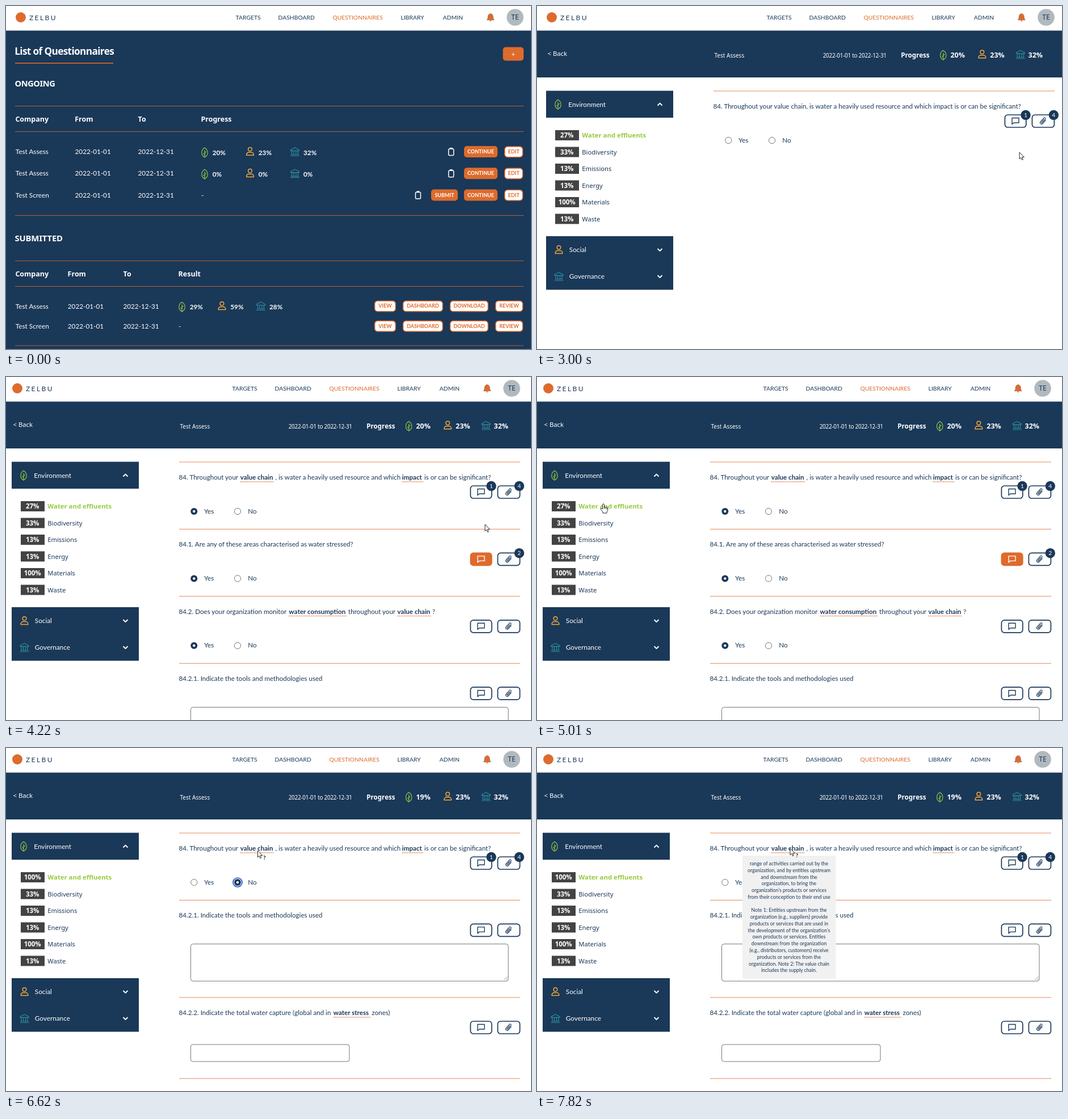
An HTML page that plays this animation: 925 px wide and 605 px high, repeating every 8 s.

```html
<!DOCTYPE html>
<html lang="en">
<head>
<meta charset="utf-8">
<title>Questionnaires</title>
<style>
html, body { margin: 0; width: 100%; height: 100%; overflow: hidden; background: #fff; }
svg { display: block; width: 925px; height: 605px; }
text { font: 11.76px Lato, sans-serif; fill: #1a3858; white-space: pre; }
.h { font-family: "Noto Sans", "Open Sans", sans-serif; }
.s { font-weight: 600; }
.b { font-weight: 700; }
.w { fill: #fff; }
.o { fill: #dd6b2d; }
.g { fill: #97c93d; }
.m { text-anchor: middle; }
</style>
</head>
<body>
<svg viewBox="0 0 925 605"><g id="scene"></g><g id="cursor"></g></svg>
<script>
const LOOP = 8000, NAVY = '#1a3858', ORANGE = '#dd6b2d';

// Drawing helpers
const text = (x, y, s, cls = '', size = 11.76, spacing = 0) =>
  `<text x="${x}" y="${y}" class="${cls}" style="font-size:${size}px;letter-spacing:${spacing}px">${s.replace(/</g, '&lt;')}</text>`;
const rect = (x, y, w, h, fill, r = 0, stroke = 'none', sw = 1) =>
  `<rect x="${x}" y="${y}" width="${w}" height="${h}" rx="${r}" fill="${fill}" stroke="${stroke}" stroke-width="${sw}"/>`;
const circle = (x, y, r, fill, stroke = 'none', sw = 1) =>
  `<circle cx="${x}" cy="${y}" r="${r}" fill="${fill}" stroke="${stroke}" stroke-width="${sw}"/>`;
const path = (d, stroke, sw = 1.2, fill = 'none') =>
  `<path d="${d}" fill="${fill}" stroke="${stroke}" stroke-width="${sw}" stroke-linejoin="round"/>`;
const at = (x, y, s) => `<g transform="translate(${x} ${y})">${s}</g>`;
const rule = (x1, x2, y) => rect(x1, y, x2 - x1, 1, 'rgba(221,107,45,.8)');

const leaf = path('M0-8.3C7-4 7 5 0 8.3C-7 5-7-4 0-8.3ZM0-4V9.5M0 1L2.7-1.6M0 4L-2.7 1.4', '#8fc043', 1.2);
const person = circle(0, -4, 3.3, 'none', '#f2a93b', 1.5) +
  path('M-6.3 6.5V5.5a4 4 0 0 1 4-4H2.3a4 4 0 0 1 4 4V6.5Z', '#f2a93b', 1.5);
const bank = path('M-7.5-3.2L0-7.2L7.5-3.2V-1.6H-7.5ZM-5.5-1V4.6M-2-1V4.6M2-1V4.6M5.5-1V4.6M-6.8 5H6.8M-8 7.2H8', '#2f8fa0', 1.1);
const bin = rect(-4.5, -5, 9, 11.5, 'none', 1.5, '#fff', 1.5) + path('M-2.5-6.2H2.5', '#fff', 1.8);
const clip = '<g transform="rotate(42)">' +
  path('M2.6-4.5V3.6a2.6 2.6 0 0 1-5.2 0V-5a1.8 1.8 0 0 1 3.6 0V3a.9.9 0 0 1-1.8 0V-4', NAVY, 1.1) + '</g>';
const bell = path('M0-7C4-6.5 4.6-3 4.7 0C4.8 2 5.5 3 6.5 4.2H-6.5C-5.5 3-4.8 2-4.7 0C-4.6-3-4-6.5 0-7Z', '#7a4a3c', .5, ORANGE) +
  path('M-1.8 5a1.8 1.8 0 0 0 3.6 0Z', 'none', 0, ORANGE);

function header() {
  const items = [[398.6, 'TARGETS'], [473.6, 'DASHBOARD'], [569.4, 'QUESTIONNAIRES'], [689.6, 'LIBRARY'], [763.8, 'ADMIN']];
  return circle(20, 20, 9, ORANGE) + text(35, 24.5, 'ZELBU', '', 12, 2.4) +
    items.map(([x, s], i) => text(x, 24.3, s, i === 2 ? 'o' : '', 10.35)).join('') +
    at(847.7, 20.5, bell) + circle(891, 20, 14.8, '#b0b9be') + text(891, 24.3, 'TE', 'm h', 12);
}

// List of questionnaires
function scores(xs, y, values) {
  return [leaf, person, bank].map((icon, i) =>
    at(xs[i], y + [1.3, -.3, 0][i], icon) +
    text(xs[i] + [13.7, 14.8, 15][i], y + 5.5, values[i] + '%', 'b w')).join('');
}
function button(x1, x2, y, label, solid) {
  const box = solid ? rect(x1, y - 10, x2 - x1, 20, ORANGE, 5)
                    : rect(x1 + .7, y - 9, x2 - x1 - 1.4, 18.5, '#fff', 5, ORANGE, 1.5);
  return box + text((x1 + x2) / 2, y + 3.1, label, 'm b ' + (solid ? 'w' : 'o'), 9);
}
function tableRow(y, name, xs) {
  return text(16.8, y + 4, name, 'w') + text(xs[0], y + 4, '2022-01-01', 'w') + text(xs[1], y + 4, '2022-12-31', 'w');
}
function list() {
  const heads = (y, xs, last) => ['Company', 'From', 'To', last]
    .map((s, i) => text(xs[i], y, s, 'h s w', 12.5)).join('');
  const ongoing = [257, 295.2, 333.5].map((y, i) =>
    tableRow(y, i < 2 ? 'Test Assess' : 'Test Screen', [121.5, 232.5]) +
    (i < 2 ? scores([350, 430, 509], y, [[20, 23, 32], [0, 0, 0]][i]) + at(784.3, y, bin)
           : text(344, y + 4, '-', 'w') + at(726, y, bin) + button(749, 796, y, 'SUBMIT', true)) +
    button(807, 866, y, 'CONTINUE', true) + button(878, 911, y, 'EDIT')).join('');
  const submitted = [529.3, 564.5].map((y, i) =>
    tableRow(y + .5, i ? 'Test Screen' : 'Test Assess', [108.8, 206.4]) +
    (i ? text(304, y + 4, '-', 'w') : scores([310, 380.5, 449], y, [29, 59, 28])) +
    button(649, 687, y, 'VIEW') + button(699, 770, y, 'DASHBOARD') +
    button(782, 850, y, 'DOWNLOAD') + button(862, 911, y, 'REVIEW')).join('');
  return rect(0, 43.4, 925, 562, NAVY) + at(6, 0, header()) +
    text(15.2, 85.7, 'List of Questionnaires', 'h s w', 17.2, -.62) + rect(16, 100, 173, 1.6, ORANGE) +
    rect(875.5, 72.5, 36.5, 24, ORANGE, 5) + text(893.7, 89, '+', 'm w', 12) +
    text(15.5, 142, 'ONGOING', 'h s w', 14.6, -.4) + text(15.5, 415, 'SUBMITTED', 'h s w', 14.9, -.2) +
    [176, 221, 369, 449, 494, 598.5].map(y => rule(16, 912, y)).join('') +
    heads(203.8, [16.4, 121.2, 232.6, 343.4], 'Progress') + heads(476.8, [16.4, 108.6, 206.6, 303.6], 'Result') +
    ongoing + submitted;
}

// Questionnaire page
function sidebar(water) {
  const panel = (y, h) => rect(10, y, 224, h, NAVY);
  const entry = (y, x, icon, label, dir) => at(x, y, icon) + text(x + 18.3, y + 4.2, label, 'w') +
    path(`M206.5 ${y - 2 * dir}l4 ${4 * dir}l4 ${-4 * dir}`, '#fff', 1.8);
  const topics = [[water, 'Water and effluents'], [33, 'Biodiversity'], [13, 'Emissions'], [13, 'Energy'], [100, 'Materials'], [13, 'Waste']];
  return panel(149.5, 47.5) + entry(173.5, 31, leaf, 'Environment', -1) +
    panel(406, 94.5) + entry(430, 32.5, person, 'Social', 1) + entry(477, 32.5, bank, 'Governance', 1) +
    topics.map(([n, s], i) => {
      const y = 228 + i * 29.5;
      return rect(26, y - 9, 42, 18, '#434343') + text(46.7, y + 4.2, n + '%', 'm h b w', 11.5) +
        text(73.3, y + 4.2, s, i ? 'h' : 'h b g', i ? 11.15 : 11.35);
    }).join('');
}
function radio(x, y, state) {
  if (!state) return circle(x, y, 5.6, '#fff', '#767676');
  return (state === 'focus' ? circle(x, y, 8, '#fff', '#1f56d0', 1.7) : '') +
    circle(x, y, 6, NAVY) + circle(x, y, 2.2, '#fff');
}
function tools(y, notes, files, solid) {
  const badge = (x, n) => n ? circle(x, y + .8, 8.7, NAVY) + text(x, y + 4.3, String(n), 'm w', 10.2) : '';
  return rect(818.4, y + .5, 37.4, 22, solid ? ORANGE : '#fff', 5, solid ? ORANGE : NAVY, 1.7) +
    at(837, y + 11, path('M-6-5H6V3.5H-3L-6 6Z', solid ? '#fff' : NAVY, 1.4)) +
    rect(866.4, y + .5, 39, 22, '#fff', 5, NAVY, 1.7) + at(885.5, y + 11.5, clip) +
    badge(855, notes) + badge(904.3, files);
}
// Parts alternate: x, plain words, x, glossary term
function wording(y, parts, rich) {
  const size = 11.6, words = parts.filter((_, i) => i % 2);
  if (!rich) return text(parts[0], y, words.join(' ').replace(/ ([,?])/g, '$1'), '', size);
  return words.map((s, i) => {
    const x = parts[2 * i], term = i % 2;
    return text(x, y, s, term ? 'b' : '', size) + (term
      ? `<path d="M${x} ${y + 3.8}H${parts[2 * i + 2] - 2}" stroke="${ORANGE}" stroke-width="1.5" stroke-dasharray="1.5 1.5"/>` : '');
  }).join('');
}
const Q = {
  chain: [304.6, '84. Throughout your', 412.8, 'value chain', 474.6, ', is water a heavily used resource and which', 697.8, 'impact', 737, 'is or can be significant?'],
  areas: [304.6, '84.1. Are any of these areas characterised as water stressed?'],
  monitor: [304.6, '84.2. Does your organization monitor', 498.6, 'water consumption', 603, 'throughout your', 689.6, 'value chain', 751, '?'],
  methods: [304.6, '84.2.1. Indicate the tools and methodologies used'],
  capture: [304.6, '84.2.2. Indicate the total water capture (global and in', 576.8, 'water stress', 644.5, 'zones)']
};
function question(y, parts, rich, { yes, no, choice = false, notes, files, solid } = {}) {
  return rule(305, 906, y - .5) + wording(y + 31, parts, rich) + tools(y + 41.5, notes, files, solid) +
    (choice ? radio(331.3, y + 87, yes) + text(349, y + 90.5, 'Yes') +
              radio(408, y + 87, no) + text(426.3, y + 90.5, 'No') : '');
}
const field = (y, w, h) => rect(325.5, y, w, h, '#fff', 4, '#767676');
const area = y => field(y, 559.5, 65.5) + path(`M877.5 ${y + 63.5}l6-6M881 ${y + 63.5}l2.5-2.5`, '#767676', .8);

function questions({ rich, full, yes, no, short }) {
  const step = 118.4, row = i => 150 + i * step;
  const first = question(150, Q.chain, rich, { choice: true, yes, no, notes: 1, files: 4 });
  if (!full) return first;
  if (short) return first + question(row(1), Q.methods, rich) + area(row(1) + 77.3) +
    question(440, Q.capture, rich) + field(523, 279.5, 30) + rule(305, 906, 582.5);
  return first +
    question(row(1), Q.areas, rich, { choice: true, yes: 'on', files: 2, solid: true }) +
    question(row(2), Q.monitor, rich, { choice: true, yes: 'on' }) +
    question(row(3), Q.methods, rich) + area(row(3) + 77.3);
}
const NOTE = `range of activities carried out by the
organization, and by entities upstream
and downstream from the
organization, to bring the
organization’s products or services
from their conception to their end use

Note 1: Entities upstream from the
organization (e.g., suppliers) provide
products or services that are used in
the development of the organization’s
own products or services. Entities
downstream from the organization
(e.g., distributors, customers) receive
products or services from the
organization. Note 2: The value chain
includes the supply chain.`.split('\n');
const tooltip = opacity => `<g opacity="${opacity}">` + rect(362, 190, 164.5, 217, '#f1f1f1', 3) +
  NOTE.map((s, i) => text(444, 207 + i * 11.77, s, 'm', 8.75)).join('') + '</g>';

function page(o) {
  const score = (x, n) => text(x, 90.7, n + '%', 'h b w', 12.4);
  return rect(0, 43.4, 925, 82.6, NAVY) + at(o.shift || 0, 0, header() +
    text(12.5, 87.5, '< Back', 'h w', 11.3) + text(306.5, 91, 'Test Assess', 'h w', 10) +
    text(497.7, 91, '2022-01-01 to 2022-12-31', 'h w', 10, -.3) + text(635.3, 90.7, 'Progress', 'h b w', 11.6) +
    at(709.7, 86.5, leaf) + score(722.5, o.done ? 19 : 20) + at(778.3, 85.3, person) + score(792.3, 23) +
    at(845.8, 85.5, bank) + score(859.6, 32) +
    sidebar(o.done ? 100 : 27) + questions(o) + (o.tip ? tooltip(o.tip) : ''));
}

const answered = { rich: true, full: true, yes: 'on' };
const declined = { rich: true, full: true, no: 'focus' };
const result = { ...declined, short: true, done: true };
const scenes = [
  [0, list()],
  [3000, page({ shift: 6 })],
  [3210, page({ ...answered, rich: false })],
  [3410, page(answered)],
  [6020, page(declined)],
  [6220, page({ ...declined, short: true })],
  [6620, page(result)],
  [6820, page({ ...result, tip: .6 })],
  [7020, page({ ...result, tip: 1 })]
];

// Pointer: time, x, y, shape
const arrow = path('M0 0V11.8L2.7 9.3L4.5 13.5L6.3 12.7L4.6 8.6H8.3Z', '#111', .9, '#fff');
const pointers = {
  none: '',
  arrow,
  hand: path('M-1.4 9V1.2a1.4 1.4 0 0 1 2.8 0V6l.5-.6a1.2 1.2 0 0 1 2 .5l.4-.3a1.1 1.1 0 0 1 1.7.7l.3-.1a1 1 0 0 1 1.3 1V11.5L6 14.2V16H-1V14.2L-4.6 9.6a1.2 1.2 0 0 1 1.7-1.7ZM1.4 6V8.6M3.9 6V8.8M6 6.8V9', '#111', .9, '#fff'),
  help: arrow + '<text x="9.8" y="15.8" style="font:700 9.5px Lato,sans-serif;fill:#111;stroke:#fff;stroke-width:1.4;paint-order:stroke">?</text>'
};
const moves = [
  [0, 0, 0, 'none'], [200, 483, 450, 'arrow'], [400, 602, 393, 'arrow'], [600, 737, 322, 'arrow'],
  [800, 822, 271, 'arrow'], [1000, 840, 258, 'hand'], [1400, 839.5, 257.5, 'hand'],
  [3000, 850, 258, 'arrow'], [4220, 844, 260, 'arrow'], [4420, 690, 259, 'arrow'], [4620, 420, 250, 'arrow'],
  [4820, 185, 235, 'arrow'], [5010, 117, 224, 'hand'], [5210, 154, 226, 'hand'], [5410, 245, 216, 'arrow'],
  [5610, 366, 228, 'arrow'], [5820, 406.5, 235, 'arrow'], [6420, 428, 211, 'arrow'],
  [6620, 443.5, 181, 'help'], [6820, 445.5, 178, 'help'], [7820, 446, 177, 'help']
];

const sceneNode = document.getElementById('scene'), cursorNode = document.getElementById('cursor');
const current = (table, t) => table.findLast(row => row[0] <= t);
let shownScene, shownMove;

function render(t) {
  const scene = current(scenes, t), move = current(moves, t);
  if (scene !== shownScene) sceneNode.innerHTML = scene[1];
  if (move !== shownMove) cursorNode.innerHTML = at(move[1], move[2], pointers[move[3]]);
  shownScene = scene;
  shownMove = move;
}
const start = performance.now();
function tick(now) {
  render(Math.max(0, now - start) % LOOP);
  requestAnimationFrame(tick);
}
render(0);
requestAnimationFrame(tick);
</script>
</body>
</html>
```
